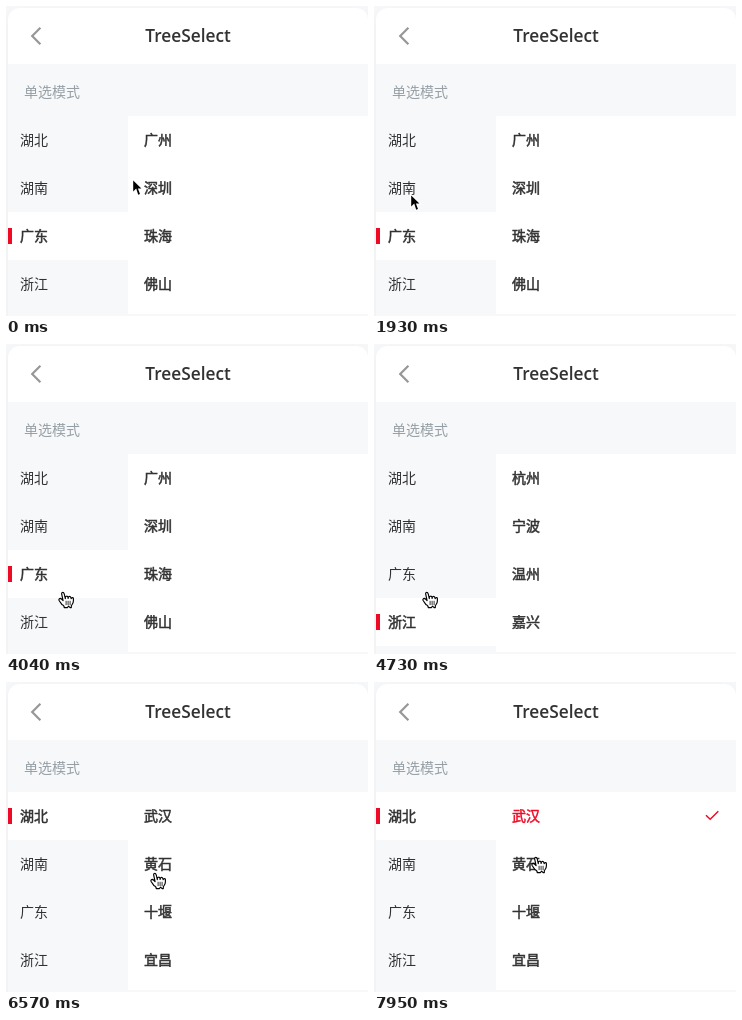
An HTML page for the animation above (8000 ms loop, 362 by 310 pixels).

```html
<!DOCTYPE html>
<html lang="zh-CN">
<head>
<meta charset="utf-8">
<title>TreeSelect</title>
<style>
  html, body { margin: 0; width: 100%; height: 100%; overflow: hidden; background: #f7f8fa; }
  svg { display: block; width: 362px; height: 310px; }
  text { font: 14px "Noto Sans CJK SC", "Noto Sans CJK", "Noto Sans SC", sans-serif; fill: #323233; }
  .title { font: 600 17.3px "Open Sans", "Noto Sans", sans-serif; text-anchor: middle; }
  .label { fill: #969fa5; }
  .medium { stroke: #323233; stroke-width: .5px; }
  .picked { fill: #ee0a24; stroke: #ee0a24; }
  .panel { filter: drop-shadow(0 4px 6px #ebedf0); }
</style>
</head>
<body>
<svg viewBox="0 0 362 310">
  <defs><clipPath id="clip"><rect x="2" y="2" width="360" height="400" rx="12"/></clipPath></defs>
  <rect class="panel" x="2" y="2" width="360" height="400" rx="12" fill="#f7f8fa"/>
  <rect x="2" y="2" width="360" height="56" fill="#fff" clip-path="url(#clip)"/>
  <path d="M34.4 21.8L26.2 30L34.4 38.2" fill="none" stroke="#969799" stroke-width="2.2"/>
  <text class="title" x="182" y="36">TreeSelect</text>
  <text class="label" x="18" y="91">单选模式</text>
  <rect x="122" y="110" width="240" height="198" fill="#fff"/>
  <g id="active">
    <rect x="2" y="110" width="120" height="48" fill="#fff"/>
    <rect x="2" y="126" width="4" height="16" fill="#ee0a24"/>
  </g>
  <g id="rows"></g>
  <path id="check" d="M332 133.3L336.2 137.3L344.3 129.2" fill="none" stroke="#ee0a24" stroke-width="1.5"/>
  <g id="arrow">
    <path d="M.2 0V15.9L4.2 12.1L5.7 18.1L9.3 16.6L7.3 11.5H11.8Z" fill="#fff"/>
    <path d="M1.2 2.4V13.5L4.2 10.6L6.2 16.8L8 16L5.9 10.5H9.4Z"/>
  </g>
  <g id="hand">
    <g transform="translate(-.5 .7)" stroke="#000" stroke-width="1.15" stroke-linejoin="round" stroke-linecap="round">
      <path fill="#fff" d="M3.3 12.7L.6 8.8C0 7.7 .8 6.7 1.9 6.7C2.9 6.8 3.5 7.7 4.6 8.9L3.4 3.4C3 1.8 3.1 .9 3.8 .8C4.9 .5 5.5 1.4 5.8 2.4L6.8 6.9C6.7 5.4 7 4.6 7.8 4.5C9.1 4.3 9.6 5.2 9.6 6.8C9.7 5.3 10.1 4.7 11 4.6C12.3 4.6 12.5 5.3 12.7 6.9C13 5.6 14.8 5.5 14.9 6.8V9.1C14.9 11.9 13.9 12.2 12.8 14V15.9H11.6L10.1 14.5L8.8 15.9H5.7C6 14.5 5.2 14.4 4.4 13.4Z"/>
      <path stroke-width=".8" d="M7.6 9.5V13M9.6 9.5V13M11.6 9.5V13"/>
    </g>
  </g>
</svg>
<script>
const LOOP = 8000, ROW = 48, TICK = 57;
const HAND_AT = 2640, CHECK_AT = 7670;

const tree = [
  ["湖北", "武汉 黄石 十堰 宜昌"],
  ["湖南", "长沙 株洲 湘潭 衡阳"],
  ["广东", "广州 深圳 珠海 佛山"],
  ["浙江", "杭州 宁波 温州 嘉兴"]
].map(([name, cities]) => ({ name, cities: cities.split(" ") }));

// each move glides on from the last one; "pick" selects a province as it starts
const moves = [
  { at: 0, end: 240, to: [125, 173] },
  { at: 903, end: 1760, to: [41, 202] },
  { at: 1765, end: 1930, to: [36, 187] },
  { at: 2583, end: 2700, to: [31, 185] },
  { at: 2990, end: 3390, to: [34, 216], pick: "湖南" },
  { at: 3513, end: 3630, to: [35, 219] },
  { at: 3810, end: 4380, to: [47, 270], bow: 11, pick: "广东" },
  { at: 4550, end: 5010, to: [43, 227], bow: 4, pick: "浙江" },
  { at: 5180, end: 5530, to: [37, 182], bow: 1, pick: "广东" },
  { at: 5710, end: 6160, to: [35, 131], pick: "湖南" },
  { at: 6330, end: 6558, to: [145, 190], pick: "湖北" },
  { at: 6570, end: 7090, to: [134, 172], bow: 10 },
  { at: 7093, end: 7500, to: [147, 143] },
  { at: 7670, end: 7950, to: [158, 174] }
];
let selected = 2, from = [126, 172];
for (const m of moves) {
  if (m.pick) selected = tree.findIndex(p => p.name === m.pick);
  Object.assign(m, { selected, from });
  from = m.to;
}

const $ = id => document.getElementById(id);
const show = (el, on) => el.setAttribute("visibility", on ? "visible" : "hidden");
const easeOut = p => 1 - (1 - p) ** 1.6;

function addText(x, row, name) {
  const el = document.createElementNS("http://www.w3.org/2000/svg", "text");
  el.setAttribute("x", x);
  el.setAttribute("y", 139 + row * ROW);
  el.textContent = name;
  $("rows").append(el);
  return el;
}
const provinces = tree.map((p, i) => addText(14, i, p.name));
const cities = tree.map((p, i) => addText(138, i, ""));
cities.forEach(el => el.classList.add("medium"));

// the pointer advances in ticks; 8 ms of slack absorbs timer rounding
function pointer(m, t) {
  const passed = Math.floor((t - m.at + 8) / TICK) * TICK;
  const e = easeOut(Math.min(1, passed / (m.end - m.at)));
  const [x, y] = m.from.map((v, i) => v + (m.to[i] - v) * e);
  return [x + (m.bow || 0) * Math.sin(Math.PI * e), y].map(Math.round);
}

function draw(t) {
  const move = moves.findLast(m => m.at <= t);
  const picked = t >= CHECK_AT, isHand = t >= HAND_AT;

  $("active").setAttribute("transform", `translate(0 ${move.selected * ROW})`);
  provinces.forEach((el, i) => el.classList.toggle("medium", i === move.selected));
  cities.forEach((el, i) => {
    const name = tree[move.selected].cities[i];
    if (el.textContent !== name) el.textContent = name;
  });
  cities[0].classList.toggle("picked", picked);
  show($("check"), picked);

  show($("arrow"), !isHand);
  show($("hand"), isHand);
  $(isHand ? "hand" : "arrow").setAttribute("transform", `translate(${pointer(move, t)})`);
}

const begin = performance.now();
function frame() {
  draw((performance.now() - begin) % LOOP);
  requestAnimationFrame(frame);
}
draw(0);
requestAnimationFrame(frame);
</script>
</body>
</html>
```
